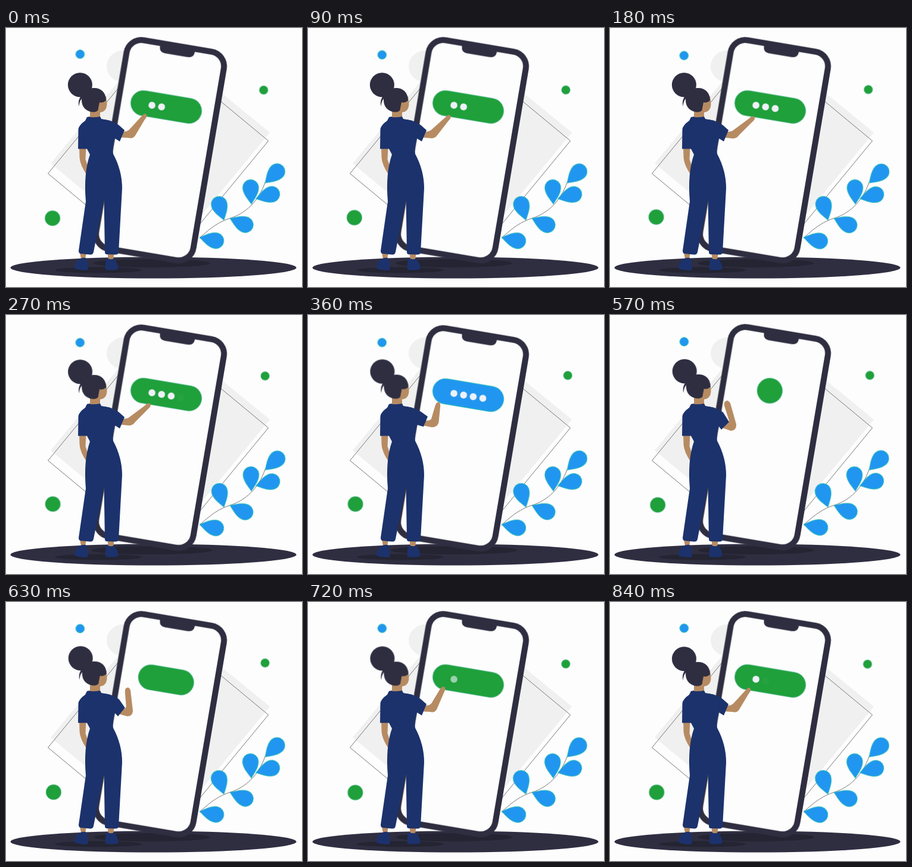
Recreate the animation shown at these times as an HTML page. Size 497x436 px, loop 870 ms.

```html
<!DOCTYPE html>
<html lang="en">
<head>
<meta charset="utf-8">
<title>Passcode entry</title>
<style>
  html, body { margin: 0; width: 100%; height: 100%; overflow: hidden; background: #fdfdfd; }
  svg { display: block; width: 497px; height: 436px; }

  :root { --ink: #2f2e41; --blue: #2196f0; --green: #1fa03a; --suit: #1c326c; --skin: #b78b62; }
  .ink { fill: var(--ink); }
  .suit { fill: var(--suit); }
  .skin { fill: var(--skin); }
  .shade { fill: #242432; }
  .pale { fill: #f0f0f0; }
  .line { fill: none; stroke: #777; }
  .blue { fill: var(--blue); stroke: #16c0a2; stroke-width: .8; }
  .green { fill: var(--green); stroke: #62bda6; stroke-width: .6; }
  .dots { fill: #eff1f8; }

  .anim, .dots circle { animation: 870ms linear infinite; }
  .phone { animation-name: dip; animation-timing-function: ease-in-out; }
  .shadow { animation-name: spread; animation-timing-function: ease-in-out; transform-origin: 245px 396px; }
  .pill { animation-name: pill, tint; }
  .arm { animation-name: arm; }
  .sleeve { animation-name: sleeve; }
  .sway { animation-name: sway; animation-timing-function: ease-in-out; }
  .hair { animation-name: nod; animation-timing-function: ease-in-out; }
  .ball1 { animation-name: ball1; }
  .ball2 { animation-name: ball2; animation-timing-function: ease-in-out; }
  .ball3 { animation-name: ball3; }
  .dots .d1 { animation-name: d1; }
  .dots .d2 { animation-name: d2; }
  .dots .d3 { animation-name: d3; }
  .dots .d4 { animation-name: d4; }

  @keyframes dip {
    0%, 24.14%, 57.47%, 100% { transform: translateY(0); }
    39.66% { transform: translateY(2px); }
  }
  @keyframes spread {
    0%, 24.14%, 57.47%, 100% { transform: scaleX(1); }
    39.66% { transform: scaleX(1.09); }
  }
  @keyframes pill {
    0%, 52.87% { x: 227.2px; width: 120.4px; transform: translateY(0); animation-timing-function: cubic-bezier(.65, 0, .35, 1); }
    65.52% { x: 264.5px; width: 42.6px; transform: translateY(-5.3px); animation-timing-function: cubic-bezier(.4, 0, .3, 1); }
    80.46%, 100% { x: 227.2px; width: 120.4px; transform: translateY(0); }
  }
  @keyframes tint {
    0%, 35% { fill: #1fa03a; stroke: #62bda6; }
    36%, 63% { fill: #2196f0; stroke: #16c0a2; }
    64%, 100% { fill: #1fa03a; stroke: #62bda6; }
  }
  @keyframes d1 { 0%, 57.47% { opacity: 1; } 60.92%, 80.46% { opacity: 0; } 84.48%, 100% { opacity: 1; } }
  @keyframes d2 { 0%, 57.47% { opacity: 1; } 60.92%, 96.55% { opacity: 0; } 100% { opacity: 1; } }
  @keyframes d3 { 0%, 13.79% { opacity: 0; } 17.24%, 57.47% { opacity: 1; } 60.92%, 100% { opacity: 0; } }
  @keyframes d4 { 0%, 31.03% { opacity: 0; } 34.48%, 57.47% { opacity: 1; } 60.92%, 100% { opacity: 0; } }

  @keyframes arm {
    0%, 93.1%, 100% { d: path("M190 174Q202 176 207 171L229 147Q233 142 236 146Q237 150 233 154L217 181Q213 187 206 185L188 184Z"); }
    20.69%, 31.03% { d: path("M190 174Q202 176 207 172L234 152Q239 146 243 150Q244 154 239 158L217 180Q213 186 206 186L188 184Z"); }
    41.38% { d: path("M190 176Q203 180 207 175L214 152Q217 144 221.500 148Q223 151 222 157L219.500 181Q217 189 208 189L188 185Z"); }
    51.72%, 68.97% { d: path("M188 182Q199 184 200 178L192 153Q190 145 197 144Q202 146 203 152L212 184Q213 194 203 195L186 189Z"); }
    82.76% { d: path("M190 174Q202 176 207 171L222 146Q226 140 230 144Q231 148 228 153L216 181Q212 187 206 185L188 184Z"); }
  }
  @keyframes sleeve {
    0%, 31.03%, 82.76%, 100% { d: path("M166 154Q182 157 190 164L199 172L191 191L180 184Z"); }
    41.38% { d: path("M166 154Q182 157 190 163L201 171L194 188L180 184Z"); }
    51.72%, 68.97% { d: path("M166 154Q182 157 190 164L200 180L187 193L180 184Z"); }
  }

  @keyframes sway {
    0%, 100% { transform: rotate(0); }
    26% { transform: rotate(1.2deg); }
    62% { transform: rotate(-.8deg); }
  }
  @keyframes nod {
    0%, 20%, 100% { transform: translate(0, 0); }
    58%, 70% { transform: translate(.8px, -1px); }
  }
  @keyframes ball1 {
    0%, 90%, 100% { transform: translate(124.4px, 44.1px); }
    21%, 41% { transform: translate(124.3px, 46.4px); }
    65.52% { transform: translate(124.4px, 45px); }
  }
  @keyframes ball2 {
    0% { transform: translate(432.6px, 104.5px); }
    57.47% { transform: translate(436.8px, 101.2px); }
    91.95% { transform: translate(432.1px, 104.8px); }
    100% { transform: translate(432.6px, 104.5px); }
  }
  @keyframes ball3 {
    0%, 100% { transform: translate(78.1px, 320.2px); }
    20.69% { transform: translate(77.6px, 318.2px); }
    41.38% { transform: translate(79.6px, 318.2px); }
    57.47% { transform: translate(80.5px, 319.2px); }
    82.76% { transform: translate(79.4px, 320.7px); }
  }
</style>
</head>
<body>
<svg viewBox="0 0 497 436">
  <defs>
    <path id="leaf" d="M0 0C8-5 17-13.300 28-13.300A13.300 13.300 0 0 1 28 13.300C17 13.300 8 5 0 0Z"/>
  </defs>

  <!-- backdrop -->
  <ellipse class="pale" cx="198" cy="64.500" rx="29" ry="27"/>
  <path class="pale" d="M75 228L249 17L443 176L268 388Z"/>
  <path class="line" d="M70.500 245L247.500 29.500L440.500 190L263.500 405.500Z"/>
  <circle class="anim blue ball1" r="7.300"/>
  <circle class="anim green ball2" r="7.300"/>
  <circle class="anim green ball3" r="12.800"/>

  <!-- ground -->
  <ellipse class="ink" cx="247.500" cy="403.500" rx="240" ry="18"/>
  <ellipse class="shade anim shadow" cx="245" cy="396" rx="98" ry="7"/>
  <ellipse class="shade" cx="155" cy="407.500" rx="73" ry="5"/>

  <!-- branch -->
  <path class="line" d="M325 353.500C345 335 358 326 377 320C402 312 424 292 435 260"/>
  <g class="blue">
    <g transform="translate(435 261) rotate(-44)"><use href="#leaf" class="anim sway"/></g>
    <g transform="translate(419.500 287.500) rotate(-16)"><use href="#leaf" class="anim sway"/></g>
    <g transform="translate(412 296.500) rotate(-92.500)"><use href="#leaf" class="anim sway"/></g>
    <g transform="translate(366 323.500) rotate(-107)"><use href="#leaf" class="anim sway"/></g>
    <g transform="translate(376 320.500) rotate(22.500)"><use href="#leaf" class="anim sway"/></g>
    <g transform="translate(325 352.500) rotate(11.500)"><use href="#leaf" class="anim sway"/></g>
  </g>

  <!-- phone -->
  <g class="anim phone">
    <g transform="rotate(9.600)">
      <rect x="206.500" y="-18.300" width="165.500" height="356" rx="25" fill="#fdfdfd" stroke="#2f2e41" stroke-width="10"/>
      <path class="ink" d="M260-15H319.500V-13Q319-2.500 309-2.500H270Q260.500-2.500 260-13Z"/>
      <rect class="anim pill" x="227.200" y="64.900" width="120.400" height="42.600" rx="21.300" stroke-width=".8"/>
      <g class="dots">
        <circle class="d1" cx="263.300" cy="87.400" r="5.800"/>
        <circle class="d2" cx="279.700" cy="87.400" r="5.800"/>
        <circle class="d3" cx="296.100" cy="87.400" r="5.800"/>
        <circle class="d4" cx="312.500" cy="87.400" r="5.800"/>
      </g>
    </g>
  </g>

  <!-- woman -->
  <path class="skin" d="M123 200H134.500L133.500 221L139 238L136 248Q124 230 123.500 218Z"/>
  <path class="skin" d="M124 378H135L133 389H126ZM170 378H182L180 390H172Z"/>
  <path class="suit" d="M115 405Q115 394 123 389Q128 386 134 387Q138 394 137.500 407.500Q126 409 115 405ZM167 407Q166 394 169 387Q176 391 181 388Q189 396 188.500 406Q180 409 167 407Z"/>
  <path class="skin anim arm" d="M190 174Q202 176 207 171L229 147Q233 142 236 146Q237 150 233 154L217 181Q213 187 206 185L188 184Z"/>
  <path class="suit anim sleeve" d="M166 154Q182 157 190 164L199 172L191 191L180 184Z"/>
  <path class="suit" d="M136 150Q147 147 158 149L160 153L175 156L184 164L183 186Q178 202 180 212Q195 240 195 270L189 378Q188 382 183 381.500L169 381Q166 381 166 377L164.500 287L147 377Q146 382 141 381.500L126 380Q122 380 122 375L134 292Q130 244 141 213L136 203.500H121L121.500 170Q123 163 133 156Z"/>
  <path class="skin" d="M141 137V150Q150 151 158 149L158 142Q169 141 169.500 128L168 115L150 118Z"/>
  <g class="ink anim hair">
    <circle cx="124.400" cy="95.700" r="20.500"/>
    <path d="M168 122C168 108 159 101 148 101C136 101 127 110 127 121C127 134 136 141.500 148 141.500C153 141 155 139 155 135L157 125Q162 127 168 122Z"/>
    <path d="M127 113Q120 121 122.500 132Q123.500 121 129 117Z"/>
  </g>
</svg>
</body>
</html>
```
